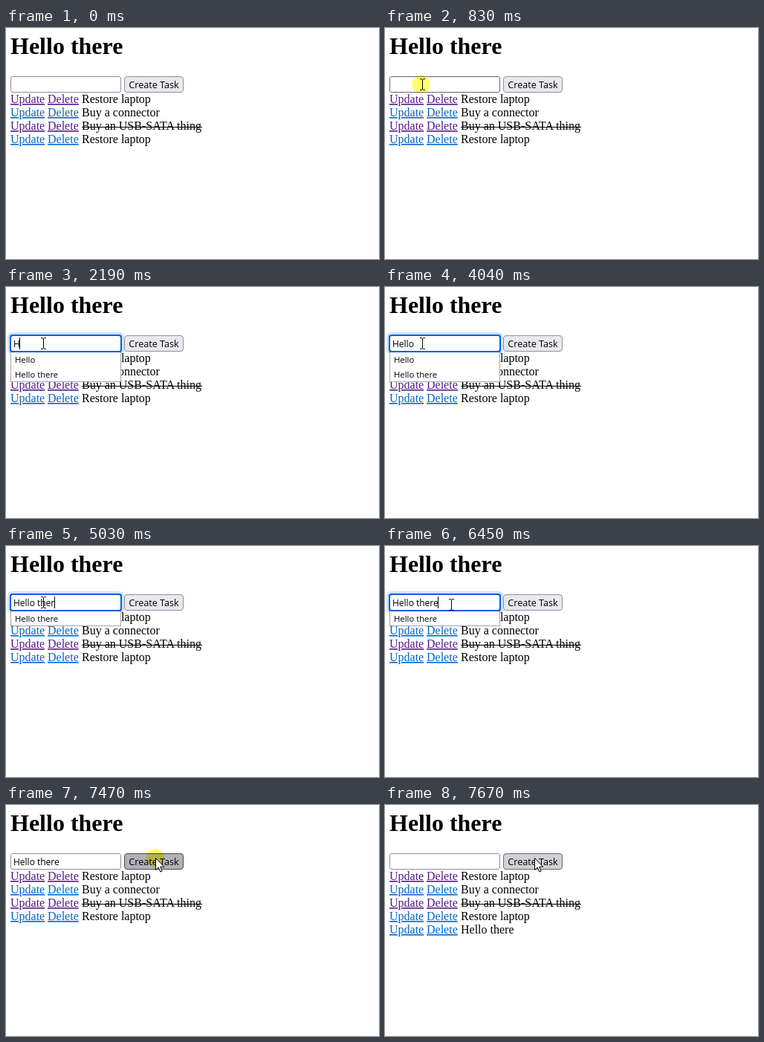
Write an HTML page that moves like this. It is 502 px wide and 311 px high and loops after 8 s.

```html
<!DOCTYPE html>
<html lang="en">
<head>
<meta charset="utf-8">
<title>Task list</title>
<style>
  html, body { margin: 0; width: 100%; height: 100%; overflow: hidden; background: #fff; }
  svg { display: block; width: 502px; height: 311px; }
  text { font: 16px "Liberation Serif", "Times New Roman", serif; fill: #000; white-space: pre; }
  .title { font-size: 32px; font-weight: bold; }
  .link { fill: #0066cc; text-decoration: underline 1px; text-underline-offset: 2px; }
  .visited { fill: #551a8b; }
  .ui { font: 12px "Open Sans", "Noto Sans", sans-serif; }
  .label { font-size: 12.6px; text-anchor: middle; }
  .option { font-size: 11.3px; }
  #field { fill: #fff; stroke: #8f8f9d; }
  #field.hover { stroke: #676774; }
  #button { fill: #e9e9ed; stroke: #8f8f9d; }
  #button.hover { fill: #d0d0d7; stroke: #676774; }
  #button.active { fill: #b1b1b9; stroke: #484851; }
  #list { fill: #fff; stroke: #a5a5a8; }
  #halo { fill: none; stroke: #0a78e8; stroke-opacity: .2; stroke-width: 3; }
  #ring { fill: none; stroke: #0060df; stroke-width: 2; }
  #glow { mix-blend-mode: multiply; fill: #ffff58; opacity: .9; }
</style>
</head>
<body>
<svg viewBox="0 0 502 311">
  <text class="title" x="6" y="35">Hello there</text>
  <g id="rows"></g>

  <rect id="halo" x="3.5" y="62.5" width="154" height="27" rx="5"/>
  <rect id="field" x="6.5" y="65.5" width="148" height="21" rx="2.5"/>
  <g id="popup">
    <rect id="list" x="6.5" y="87.5" width="148"/>
    <text id="first" class="ui option" x="12" y="102"></text>
    <text id="second" class="ui option" x="12" y="122">Hello there</text>
  </g>
  <rect id="ring" x="6" y="65" width="149" height="22" rx="2.5"/>
  <text id="typed" class="ui" x="10" y="81"></text>
  <rect id="caret" y="68" width="1" height="16"/>

  <rect id="button" x="159.5" y="65.5" width="79" height="21" rx="3.5"/>
  <text class="ui label" x="199" y="81">Create Task</text>

  <circle id="glow" r="12"/>
  <g id="pointer">
    <path id="arrow" d="M.5 .5V16.5L4.2 13L6.8 19L9.2 18L6.7 12.2H11.8Z" fill="#fff" stroke="#000"/>
    <path id="beam" d="M-3 -7.5H-1L.5 -6.5L2 -7.5H4M.5 -6.5V6.5M-3 7.5H-1L.5 6.5L2 7.5H4" fill="none" stroke="#000"/>
  </g>
</svg>
<script>
const LOOP = 8000;
const PHRASE = 'Hello there';
const FOCUS = 900, SUGGEST = 2190, NARROW = 4440, MOVE = 6180, PRESS = 7470, SUBMIT = 7670;
const keys = [2110, 2770, 3250, 3450, 3580, 3840, 4370, 4640, 4900, 5030, 5170];

const $ = id => document.getElementById(id);
const show = (id, on) => { $(id).style.display = on ? '' : 'none'; };
const clamp = u => Math.min(1, Math.max(0, u));
const within = (t, from, to) => t >= from && t < to;

const tasks = [
  { name: 'Restore laptop', seen: 'visited' },
  { name: 'Buy a connector' },
  { name: 'Buy an USB-SATA thing', seen: 'visited', done: true },
  { name: 'Restore laptop' },
  { name: PHRASE }
];
$('rows').innerHTML = tasks.map(({ name, seen = '', done }, i) => {
  const y = 101 + 18 * i;
  return `<g id="row${i}">
    <text class="link ${seen}" x="6" y="${y}">Update</text>
    <text class="link ${seen}" x="56" y="${y}">Delete</text>
    <text x="102" y="${y}">${name}</text>
    ${done ? `<path d="M102 ${y - 3.5}H264" stroke="#000"/>` : ''}</g>`;
}).join('');

// A key press turns the caret on; each beat of the blink clock toggles it.
const beat = t => Math.floor((t - 850) / 531);
function caretOn(t, lastKey) {
  return within(t, FOCUS, PRESS) && (beat(t) - beat(lastKey)) % 2 === 0;
}

// Pointer position, sampled in steps like a screen recording
function pointerAt(t) {
  if (t < MOVE) {
    const u = clamp(Math.floor((t - 200) / 70) / 8);
    const p = 1 - (1 - u) ** 2;
    return [330 - 280 * p, 261 - 185 * p];
  }
  const u = clamp((Math.floor((t - MOVE) / 67.5) - .5) / 10.5);
  const p = u * u * (3 - 2 * u);
  return [50 + 151 * p, 76 - 5 * p + 30 * p * (1 - p) ** 2];
}

function renderForm(t) {
  const count = keys.filter(key => key <= t).length;
  const typed = $('typed');
  typed.textContent = t < SUBMIT ? PHRASE.slice(0, count) : '';
  $('caret').setAttribute('x', Math.floor(10 + typed.getComputedTextLength()));
  show('caret', caretOn(t, keys[count - 1] ?? FOCUS));

  const focused = within(t, FOCUS, PRESS);
  show('halo', focused);
  show('ring', focused);
  show('row4', t >= SUBMIT);

  const single = t >= NARROW;
  show('popup', within(t, SUGGEST, PRESS));
  show('second', !single);
  $('first').textContent = single ? PHRASE : 'Hello';
  $('list').setAttribute('height', single ? 20 : 40);
}

function renderPointer(t) {
  const [x, y] = pointerAt(t).map(Math.round);
  const beam = x < 160 && y < 155;
  show('pointer', t >= 200);
  show('beam', beam);
  show('arrow', !beam);
  $('pointer').setAttribute('transform', `translate(${x} ${y})`);
  $('field').setAttribute('class', beam && y < 88 ? 'hover' : '');

  const pressed = within(t, PRESS, SUBMIT);
  const over = t > MOVE && x >= 159;
  $('button').setAttribute('class', pressed ? 'active' : over ? 'hover' : '');

  show('glow', within(t, FOCUS - 70, FOCUS) || within(t, PRESS - 70, PRESS + 70));
  $('glow').setAttribute('cx', beam ? x - 1.5 : x);
  $('glow').setAttribute('cy', y);
}

const start = performance.now();
function tick() {
  const t = (performance.now() - start) % LOOP;
  renderForm(t);
  renderPointer(t);
  requestAnimationFrame(tick);
}
tick();
</script>
</body>
</html>
```
